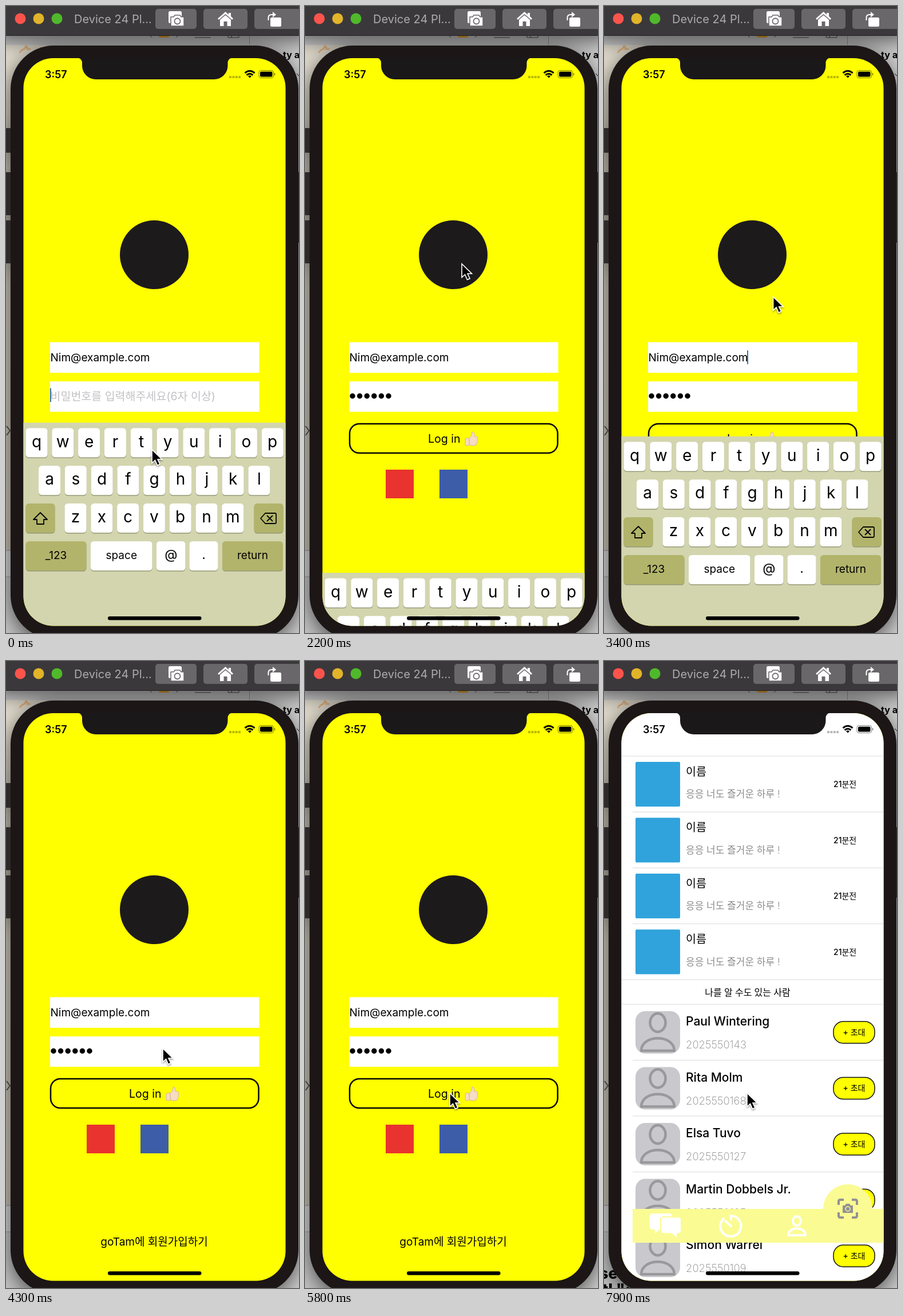
Recreate the animation shown at these times as an HTML page. Size 512 by 1094 pixels, loop 8 s.

```html
<!DOCTYPE html>
<html lang="ko">
<head>
<meta charset="utf-8">
<title>Login demo</title>
<style>
html, body { margin: 0; width: 100%; height: 100%; overflow: hidden; background: #9a9a98; }
svg { display: block; width: 100vw; height: 100vh; }
text { font-family: Inter, "Noto Sans CJK KR", "Noto Sans CJK", sans-serif; white-space: pre; }
.mid { text-anchor: middle; }
.line { stroke: #dcdcde; stroke-width: 1.2; }
.ink { fill: none; stroke: #050505; }
</style>
</head>
<body>
<svg viewBox="0 0 512 1094" xmlns="http://www.w3.org/2000/svg">
  <defs>
    <linearGradient id="side" x2="0" y2="1">
      <stop stop-color="#e6e0d2"/><stop offset=".15" stop-color="#cdc7b8"/>
      <stop offset="1" stop-color="#c6c0b2"/>
    </linearGradient>
    <clipPath id="screenClip"><rect x="30.500" y="91" width="458" height="990.500" rx="52"/></clipPath>
    <filter id="soft" x="-50%" y="-50%" width="200%" height="200%">
      <feDropShadow dx="0" dy="2" stdDeviation="1.5" flood-opacity=".4"/>
    </filter>
    <filter id="windowShadow" x="-20%" y="-20%" width="140%" height="140%">
      <feDropShadow dx="0" dy="10" stdDeviation="18" flood-opacity=".6"/>
    </filter>
  </defs>

  <!-- desktop behind the phone -->
  <rect width="512" height="1094" fill="#d2d2d3"/>
  <rect y="68" width="70" height="882" fill="url(#side)"/>
  <path d="M0 950H60M0 996H60" stroke="#8c8c8c"/>
  <path d="M0 997H80V1094H0Z" fill="#c4c4c5"/>
  <path d="M425.500 51V68" stroke="#999"/>
  <path d="M255 47l-4 4 4 4M297 47l4 4-4 4M330 55h28M388 51v4h19v-4M394 51v4" class="ink" opacity=".65"/>
  <rect x="267" y="46" width="18" height="9" rx="2" fill="#f0a92c"/>
  <path d="M24 82q2-5 8-7l3-5q3 1 2 5h6" fill="none" stroke="#e5b582" stroke-width="3"/>
  <text x="484" y="91" font-size="16" font-weight="700">ty ar</text>
  <path d="M508 118l4 4" class="ink"/>
  <path d="M1 733l6 8-6 8" fill="none" stroke="#555" stroke-width="2"/>
  <g id="log" font-weight="800" font-size="27"><text x="-8" y="1078">se</text><text x="-3" y="1106">tl ":</text></g>

  <!-- window silhouette: title bar, side buttons and phone body -->
  <g filter="url(#windowShadow)">
    <rect x="-20" width="552" height="51" fill="#3b373a"/>
    <g fill="#2d2b2c">
      <rect x="-3" y="213" width="14" height="43" rx="2"/>
      <rect x="-3" y="290" width="14" height="75" rx="2"/>
      <rect x="-3" y="374" width="14" height="75" rx="2"/>
      <rect x="508" y="290" width="6" height="123"/>
    </g>
    <rect x="8" y="69" width="503" height="1035" rx="76" fill="#1a1819"/>
  </g>

  <path d="M0 51.5H512" stroke="#201e20"/>
  <circle cx="25" cy="22" r="9.5" fill="#fc544c"/>
  <circle cx="57" cy="22" r="9.5" fill="#e1b42a"/>
  <circle cx="89" cy="22" r="9.5" fill="#50b92b"/>
  <text x="119" y="30" font-size="20" fill="#aeaaad">Device 24 Pl...</text>
  <g fill="#6a676a">
    <rect x="261" y="5" width="72" height="35" rx="5"/>
    <rect x="345" y="5" width="77" height="35" rx="5"/>
    <rect x="434" y="5" width="90" height="35" rx="5"/>
  </g>
  <g fill="#fff" stroke-linejoin="round">
    <rect x="284" y="9" width="23" height="21" rx="2.5"/>
    <path d="M288 19h5l2-3h9l2 3h5v16h-23z" stroke="#6a676a" stroke-width="1.5"/>
    <circle cx="299.500" cy="26.500" r="5" fill="none" stroke="#6a676a" stroke-width="1.8"/>
    <path d="M370 22L383.500 10 389 15v-3h4v6l4 4-2 2-11.500-10L372 24z"/>
    <path d="M374 24l9.500-8 9.500 8v11h-6.500v-8h-6v8H374z"/>
    <rect x="462" y="20" width="19" height="16" rx="2.500"/>
    <path d="M458.500 25V20q0-5 6-5h3" fill="none" stroke="#fff" stroke-width="2"/>
    <path d="M466 10l6 5-6 5z"/>
  </g>

  <g clip-path="url(#screenClip)">
    <rect x="30" y="91" width="459" height="991" fill="#ff0"/>
    <circle cx="259" cy="434" r="60" fill="#1d1a1c"/>
    <path d="M77 586.500h365.500v53.500H77zM77 655h365.500v53H77z" fill="#fff"/>
    <text x="77.500" y="620" font-size="19">Nim@example.com</text>
    <text id="hint" x="77.500" y="687.500" font-size="19.500" fill="#c2c2c5">비밀번호를 입력해주세요(6자 이상)</text>
    <g id="dots"></g>
    <text id="digit" y="688" font-size="20"></text>
    <rect id="caret" width="2" height="24" fill="#3b70c4"/>
    <rect x="78" y="729" width="363.500" height="51" rx="17" class="ink" stroke-width="2.500"/>
    <text x="215" y="762" font-size="19.500">Log in</text>
    <g stroke="#d9b596" fill="#f5dcc3">
      <path d="M287 754q5-4 5-11 5 0 4 8h4q3 1 1 4 2 2 0 4 1 3-1 4 0 4-4 4h-6l-3-2z"/>
      <rect x="280" y="754" width="7" height="13" rx="2"/>
    </g>
    <rect x="141" y="809" width="49" height="50" fill="#e9332f"/>
    <rect x="235" y="809" width="49" height="50" fill="#3d5da8"/>
    <text x="259" y="1020" font-size="19" class="mid">goTam에 회원가입하기</text>
    <g id="keyboard"><rect x="30" y="727" width="459" height="360" fill="#d3d5ae"/></g>

    <g id="list">
      <rect x="30" y="91" width="459" height="1000" fill="#fff"/>
      <path d="M31 166H488M31 556H488M31 599H488" class="line"/>
      <text x="251" y="583.500" font-size="16" font-weight="500" class="mid">나를 알 수도 있는 사람</text>
      <g id="rows"></g>
      <rect x="50" y="956" width="439" height="59" fill="#fbfb94"/>
      <circle cx="426" cy="956" r="43" fill="#fbfb94"/>
      <g fill="none" stroke="#fff" stroke-width="4" stroke-linecap="round">
        <path d="M85 964h29q5 0 5 5v18q0 5-5 5H97l-8 7v-7h-4q-5 0-5-5v-18q0-5 5-5z" fill="#fff" stroke="none"/>
        <path d="M104 970h26q5 0 5 5v19q0 5-5 5h-2v9l-10-9h-14q-5 0-5-5v-19q0-5 5-5z" fill="#fff" stroke="#fbfb94" stroke-width="2"/>
        <path d="M222 974v-6a18 18 0 1 1-13 5M212 977l10 9"/>
        <ellipse cx="337" cy="977" rx="7" ry="8"/>
        <path d="M322 1002c0-16 30-16 30 0z" stroke-linejoin="round"/>
      </g>
      <g fill="none" stroke="#929292" stroke-width="4">
        <path d="M410 949v-6q0-3 3-3h6M433 940h6q3 0 3 3v6M442 962v6q0 3-3 3h-6M419 971h-6q-3 0-3-3v-6"/>
        <path d="M417 950h4l2-3h6l2 3h4v13h-18z" fill="#929292" stroke="none"/>
        <circle cx="426" cy="956" r="4" stroke="#fbfb94" stroke-width="1.500"/>
      </g>
    </g>

    <text x="68" y="126" font-size="18" font-weight="600">3:57</text>
    <path d="M390 124h20" stroke="#000" stroke-opacity=".28" stroke-width="4" stroke-dasharray="4 1.400"/>
    <g class="ink" stroke-width="3">
      <path d="M417.500 117q8.500-7.500 17 0M420.500 120.500q5.500-4.500 11 0"/>
      <path d="M423 122.500q3-2.300 6 0l-3 3z" fill="#000" stroke="none"/>
      <rect x="442" y="112.500" width="25.500" height="13" rx="3.500" stroke-width="1" stroke-opacity=".5"/>
      <rect x="444" y="114.500" width="21.500" height="9" rx="2" fill="#000" stroke="none"/>
      <path d="M469.500 117v4" stroke-width="1.500" stroke-opacity=".5"/>
    </g>
    <rect x="178" y="1065" width="163.500" height="6.500" rx="3.200"/>
  </g>
  <path d="M124 90a9 9 0 0 1 9 9V104a24 24 0 0 0 24 24H363.500a24 24 0 0 0 24-24V99a9 9 0 0 1 9-9Z" fill="#1a1819"/>

  <path id="pointer" d="M0 0V23.500L5.500 18.500 9.500 27.500 14 25.500 10 17H17.500Z" stroke="#fff" stroke-width="1.600" filter="url(#soft)"/>
</svg>

<script>
const $ = id => document.getElementById(id);
const add = (id, markup) => $(id).insertAdjacentHTML('beforeend', markup);
const move = (id, x, y) => $(id).setAttribute('transform', `translate(${x} ${y})`);
const show = (id, on) => $(id).setAttribute('visibility', on ? 'visible' : 'hidden');

// Keyboard
function key(x, y, width, label = '', size = 28, fill = '#fff') {
  add('keyboard', `<rect x="${x}" y="${y + 1.5}" width="${width}" height="51" rx="5.500" fill="#979976"/>
    <rect x="${x}" y="${y}" width="${width}" height="51" rx="5.500" fill="${fill}"/>
    <text x="${x + width / 2}" y="${y + (size > 25 ? 33 : 31)}" font-size="${size}" class="mid">${label}</text>`);
}
const olive = '#b2b46b';
[['qwertyuiop', 34.5], ['asdfghjkl', 57], ['zxcvbnm', 102.5]].forEach(([letters, x], row) =>
  [...letters].forEach((letter, i) => key(x + i * 45.8, 736.5 + row * 65.8, 38, letter)));
key(34.5, 868, 51, '', 20, olive);
key(433.5, 868, 51, '', 20, olive);
key(34.5, 934, 106, '_123', 19, olive);
key(148, 934, 107.5, 'space', 19);
key(263, 934, 50.5, '@', 23);
key(320.5, 934, 50, '.', 23);
key(378, 934, 106, 'return', 19, olive);
add('keyboard', `<g class="ink" stroke-width="1.800" stroke-linejoin="round">
  <path d="M60 884l12 12h-6v8H54v-8h-6z"/>
  <path d="M445 894l8-9h17q2 0 2 2v14q0 2-2 2h-17zM456 889l10 10M466 889l-10 10"/></g>`);

// Friends and suggested contacts
const pitch = 97.5;
for (let i = 0; i < 4; i++) {
  const y = 166 + i * pitch;
  add('rows', `<rect x="55" y="${y + 10}" width="78" height="78" rx="2" fill="#30a3dc"/>
    <text x="143" y="${y + 33.5}" font-size="19.500" font-weight="500">이름</text>
    <text x="143" y="${y + 72}" font-size="17" font-weight="300" fill="#8d8d8f">응응 너도 즐거운 하루 !</text>
    <text x="401" y="${y + 54}" font-size="14" font-weight="500">21분전</text>
    ${i < 3 ? `<path d="M50 ${y + pitch}H488" class="line"/>` : ''}`);
}
const contacts = [
  ['Paul Wintering', '2025550143'], ['Rita Molm', '2025550168'], ['Elsa Tuvo', '2025550127'],
  ['Martin Dobbels Jr.', '2025550185'], ['Simon Warrel', '2025550109']
];
contacts.forEach(([name, phone], i) => add('rows', `<g transform="translate(0 ${599 + i * pitch})">
  <rect x="55" y="12" width="78" height="74" rx="17" fill="#c8c8cd"/>
  <g fill="none" stroke="#99999c" stroke-width="4.500" stroke-linejoin="round">
    <ellipse cx="94" cy="32" rx="13.500" ry="16"/><path d="M65 81c1-29 57-29 58 0z"/>
  </g>
  <text x="143" y="37" font-size="21" font-weight="500">${name}</text>
  <text x="143" y="77" font-size="18.500" font-weight="200" fill="#858587">${phone}</text>
  <rect x="401" y="30" width="72" height="38" rx="17" fill="#ff0" stroke="#111" stroke-width="1.500"/>
  <text x="437" y="53.500" font-size="14" font-weight="500" class="mid">+ 초대</text>
  <path d="M50 ${pitch}H488" class="line"/></g>`));

const dotX = i => 83 + i * 12.6;
for (let i = 0; i < 6; i++) add('dots', `<circle cx="${dotX(i)}" cy="680.500" r="4.700"/>`);

// Motion
const LOOP = 8000, STEP = 100;
const toggles = [2050, 3150, 3750, 4350, 4950]; // keyboard hides, shows, hides, ...
const pointerPath = [ // time, x, y
  [0, 255, 774], [800, 255, 774], [1700, 274, 450], [2200, 274, 450], [2900, 243, 610], [3150, 243, 610],
  [3550, 320, 460], [3750, 320, 460], [4200, 274, 676], [4350, 274, 676], [4750, 367, 470],
  [5000, 367, 470], [5600, 253, 754], [7000, 253, 754], [7400, 250, 754], [LOOP, 250, 754]
];
const spring = ms => { const a = Math.max(0, ms) * 0.0175; return 1 - Math.exp(-a) * (1 + a); };

function pointerAt(t) {
  const i = pointerPath.findIndex(p => p[0] > t);
  const [t0, x0, y0] = pointerPath[i - 1], [t1, x1, y1] = pointerPath[i];
  const u = (t - t0) / (t1 - t0), e = u * u * (3 - 2 * u);
  return [x0 + (x1 - x0) * e, y0 + (y1 - y0) * e];
}

function render(t) {
  const typed = Math.max(0, Math.min(6, Math.floor((t - 500) / 160) + 1));
  const plain = typed > 0 && t < 2050;
  const masked = typed - plain;
  [...$('dots').children].forEach((dot, i) => dot.setAttribute('visibility', i < masked ? 'visible' : 'hidden'));
  show('hint', !typed);
  $('digit').textContent = plain ? typed : '';
  $('digit').setAttribute('x', dotX(masked) - 6.5);

  const passed = toggles.filter(time => time <= t).length;
  const lift = toggles.reduce((sum, time, i) => sum + (i % 2 ? 1 : -1) * spring(t - time), 1);
  move('keyboard', 0, Math.round((1 - lift) * 355));
  show('caret', passed % 2 === 0);
  if (passed === 2) move('caret', 250, 601);
  else move('caret', typed ? dotX(typed) - 7 : 77, 667);

  move('list', 0, Math.round((1 - spring(t - 7250)) * 990));
  show('list', t > 7250);
  show('log', t >= 7500);
  move('pointer', ...pointerAt(t));
}

const start = performance.now();
function frame() {
  const t = (performance.now() - start) % LOOP;
  render(Math.floor(t / STEP) * STEP);
  requestAnimationFrame(frame);
}
frame();
</script>
</body>
</html>
```
